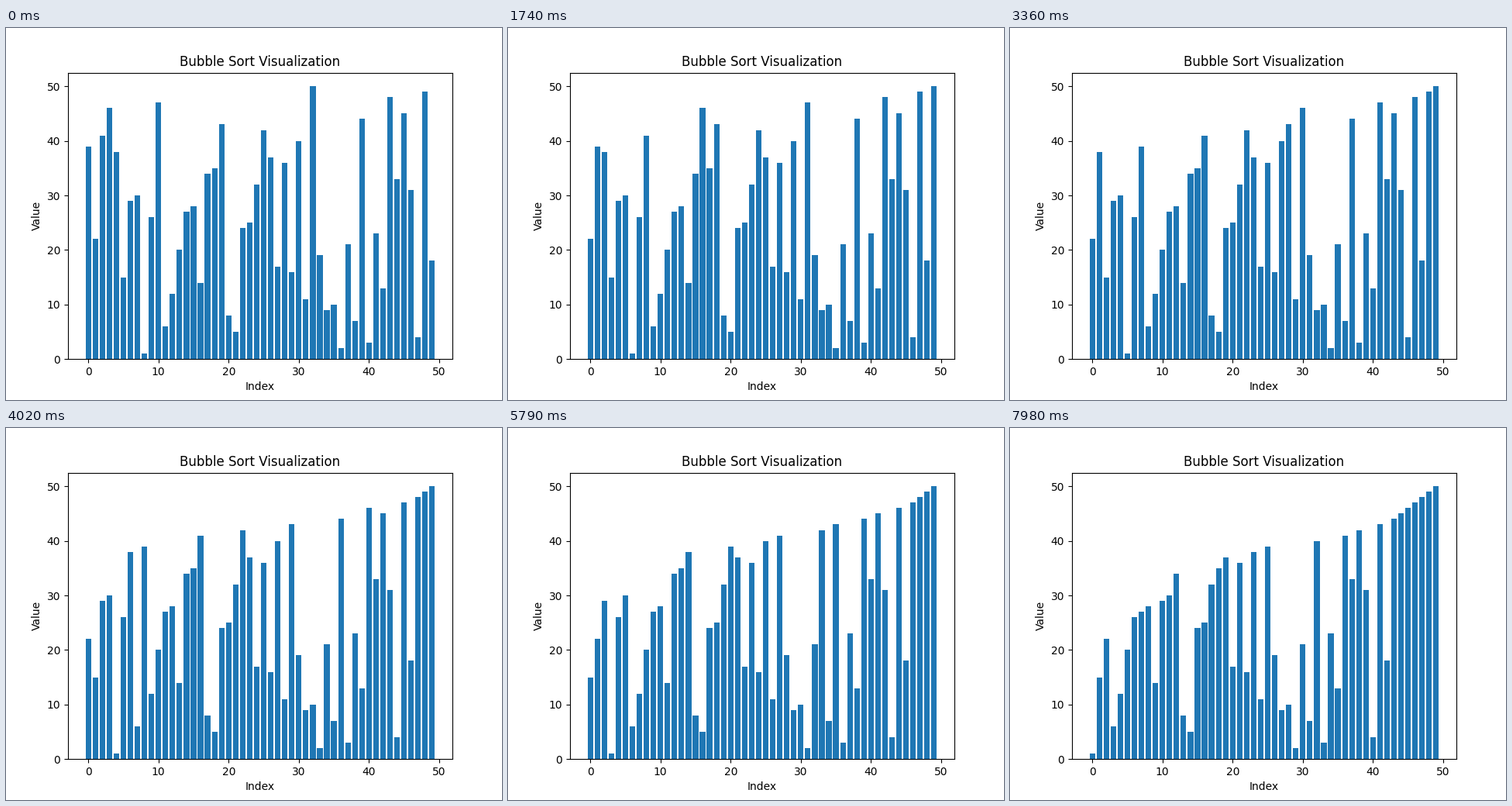
Write a matplotlib script that moves like this. It is 640 px wide and 480 px high and loops after 8000 ms.

```python
import matplotlib.pyplot as plt
from matplotlib.animation import FuncAnimation

FRAMES = 267
INTERVAL = 30  # ms
START = 3  # position already reached in the first pass

VALUES = [
    39, 22, 41, 46, 38, 15, 29, 30, 1, 26,
    47, 6, 12, 20, 27, 28, 14, 34, 35, 43,
    8, 5, 24, 25, 32, 42, 37, 17, 36, 16,
    40, 11, 50, 19, 9, 10, 2, 21, 7, 44,
    3, 23, 13, 48, 33, 45, 31, 4, 49, 18,
]


def bubble_sort(values, start):
    """Yield the list at the start and after every swap."""
    data = list(values)
    yield list(data)
    for end in range(len(data) - 1, 0, -1):
        for j in range(start, end):
            if data[j] > data[j + 1]:
                data[j], data[j + 1] = data[j + 1], data[j]
                yield list(data)
        start = 0


states = list(bubble_sort(VALUES, START))

fig, ax = plt.subplots(figsize=(6.4, 4.8), dpi=100)
bars = ax.bar(range(len(VALUES)), VALUES)
ax.set_title("Bubble Sort Visualization")
ax.set_xlabel("Index")
ax.set_ylabel("Value")


def update(frame):
    for bar, height in zip(bars, states[frame]):
        bar.set_height(height)
    return list(bars)


anim = FuncAnimation(fig, update, frames=FRAMES, interval=INTERVAL,
                     init_func=lambda: update(0), repeat=True,
                     repeat_delay=0, blit=False)
plt.show()
```
